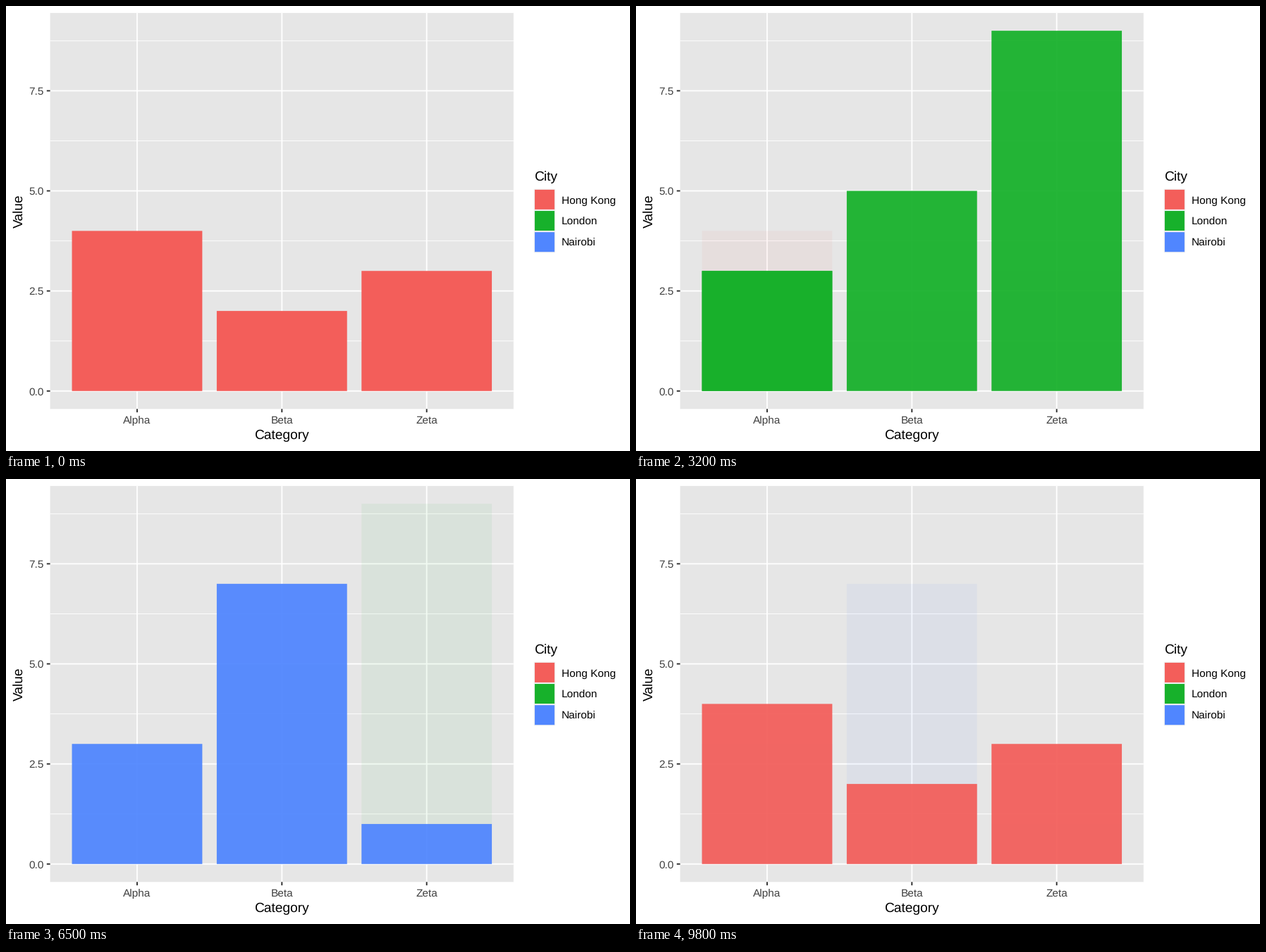
Recreate the animation shown at these times as a matplotlib script. Size 885x632 px, loop 10 s.

```python
import matplotlib.pyplot as plt
from matplotlib.animation import FuncAnimation
from matplotlib.patches import Rectangle

W, H, DPI = 885, 632, 100
FRAMES, STEP = 100, 100

plt.rcParams["font.family"] = "Liberation Sans"
plt.rcParams["text.hinting"] = "none"

COLORS = {"Hong Kong": "#F35E5A", "London": "#17B12B", "Nairobi": "#5086FF"}
VALUES = {"Hong Kong": (4, 2, 3), "London": (3, 5, 9), "Nairobi": (3, 7, 1)}
CATEGORIES = ("Alpha", "Beta", "Zeta")
PANEL_LEFT, PANEL_RIGHT, PANEL_TOP, PANEL_BOTTOM = 62.6, 719.8, 9.9, 572.3
GAP = 205.35
BAR = 0.9 * GAP
BIG, SMALL = 19.2, 15.4
MAJOR, MINOR = 1.86, 0.93

# (leaving, entering, first step, number of steps)
FADES = (
    ("Hong Kong", "London", 16, 17),
    ("London", "Nairobi", 49, 17),
    ("Nairobi", "Hong Kong", 83, 16),
)

fig = plt.figure(figsize=(W / DPI, H / DPI), dpi=DPI, facecolor="white")
ax = fig.add_axes([0, 0, 1, 1])
ax.set_xlim(0, W)
ax.set_ylim(H, 0)
ax.axis("off")


def cat_x(i):
    return 185.95 + GAP * i


def val_y(v):
    return 546.8 - 56.85 * v


def box(x0, y0, x1, y1, color, z):
    patch = Rectangle((x0, y0), x1 - x0, y1 - y0, facecolor=color,
                      linewidth=0, zorder=z, snap=False)
    return ax.add_patch(patch)


def line(x0, y0, x1, y1, color, width, z=1):
    ax.plot([x0, x1], [y0, y1], color=color, lw=width * 72 / DPI,
            solid_capstyle="butt", zorder=z, snap=False)


def label(x, y, text, px, color="black", ha="left", **kw):
    ax.text(x, y, text, fontsize=px * 72 / DPI, color=color, ha=ha,
            va="baseline", **kw)


def draw_panel():
    box(PANEL_LEFT, PANEL_TOP, PANEL_RIGHT, PANEL_BOTTOM, "#E6E6E6", 0)
    for v in (1.25, 3.75, 6.25, 8.75):
        line(PANEL_LEFT, val_y(v), PANEL_RIGHT, val_y(v), "white", MINOR)
    for v in (0, 2.5, 5, 7.5):
        y = val_y(v)
        line(PANEL_LEFT, y, PANEL_RIGHT, y, "white", MAJOR)
        line(PANEL_LEFT - 4.8, y, PANEL_LEFT, y, "#2A2A2A", MAJOR)
        label(54, y + 5.6, f"{v:.1f}", SMALL, "#404040", "right")
    for i, name in enumerate(CATEGORIES):
        x = cat_x(i)
        line(x, PANEL_TOP, x, PANEL_BOTTOM, "white", MAJOR)
        line(x, PANEL_BOTTOM, x, PANEL_BOTTOM + 4.8, "#2A2A2A", MAJOR)
        label(x, 592.8, name, SMALL, "#404040", "center")
    label(391.2, 615.2, "Category", BIG, ha="center")
    label(23.8, 291.2, "Value", BIG, ha="right", rotation=90,
          rotation_mode="anchor") if False else ax.text(
        23.8, 291.2, "Value", fontsize=BIG * 72 / DPI, rotation=90,
        rotation_mode="anchor", ha="center", va="baseline")


def draw_legend():
    label(748.6, 248.4, "City", BIG)
    for i, (city, color) in enumerate(COLORS.items()):
        y = 259.8 + 30.15 * i
        box(748.8, y, 778.95, y + 30.15, "#EFEFEF", 1)
        box(749.9, y + 1.1, 777.9, y + 29.1, color, 2)
        label(788, y + 20.9, city, SMALL)


def make_bars(city):
    return [box(cat_x(i) - BAR / 2, val_y(v), cat_x(i) + BAR / 2, val_y(0),
                COLORS[city], 3)
            for i, v in enumerate(VALUES[city])]


draw_panel()
draw_legend()
bars = {city: make_bars(city) for city in COLORS}
under = box(cat_x(0) - BAR / 2, val_y(3), cat_x(0) + BAR / 2, val_y(0),
            COLORS["London"], 2.5)


def show(city, alpha, z):
    for bar in bars[city]:
        bar.set_alpha(alpha)
        bar.set_visible(alpha > 0)
        bar.set_zorder(z)


def update(n):
    for city in COLORS:
        show(city, 0, 3)
    show("Hong Kong", 1, 3)
    under.set_visible(False)
    for old, new, start, steps in FADES:
        if n >= start:
            t = min((n - start) / steps, 1)
            for city in COLORS:
                show(city, 0, 3)
            show(old, 1 - t, 3)
            show(new, t, 4)
            under.set_visible(new == "London" and 0 < t < 1)
            under.set_alpha(t)
    return []


anim = FuncAnimation(fig, update, frames=FRAMES, interval=STEP,
                     init_func=lambda: update(0), repeat=True,
                     repeat_delay=0, blit=False)
plt.show()
```
